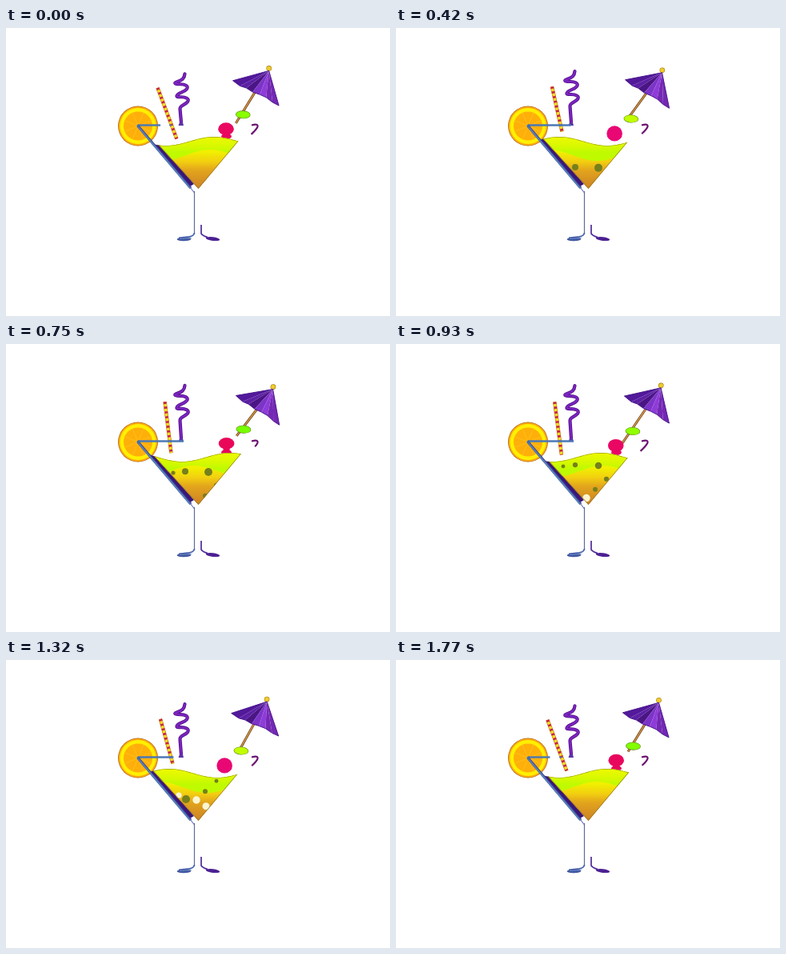
An HTML page with a canvas for the animation above (1800 ms loop, 480 px wide and 360 px high).

```html
<!DOCTYPE html>
<html lang="en">
<head>
<meta charset="utf-8">
<title>Cocktail</title>
<style>
  html, body { margin: 0; width: 100%; height: 100%; overflow: hidden; background: #fff; }
  canvas { display: block; width: 480px; height: 360px; }
</style>
</head>
<body>
<canvas id="stage" width="480" height="360"></canvas>
<script>
const c = document.getElementById('stage').getContext('2d');
const LOOP = 1800, SLOSH = 900, STEP = 30;
const TAU = Math.PI * 2;

// sway: slow swing of straw and spiral; bob: floating of olive and cherry.
let time = 0, sway = 0, bob = 0;
const osc = (peak, period) => Math.cos(TAU * (time - peak) / period);

function trace(pts) {
  c.beginPath();
  pts.forEach(([x, y]) => c.lineTo(x, y));
}
function poly(color, pts) {
  trace(pts);
  c.fillStyle = color;
  c.fill();
}
function line(color, width, pts) {
  trace(pts);
  c.strokeStyle = color;
  c.lineWidth = width;
  c.stroke();
}
function oval(color, x, y, rx, ry = rx, turn = 0) {
  c.beginPath();
  c.ellipse(x, y, rx, ry, turn, 0, TAU);
  c.fillStyle = color;
  c.fill();
}
function stroke(color, width, d) {
  c.strokeStyle = color;
  c.lineWidth = width;
  c.stroke(new Path2D(d));
}

function drawOrange() {
  const x = 165, y = 122.5;
  oval('#a9621c', x, y, 25);
  oval('#ffac10', x, y, 24.3);
  oval('#fff000', x, y, 22.5);
  oval('#ffaf0a', x, y, 18);
  for (let i = 0; i < 8; i++) {
    const a = (i + 0.5) * TAU / 8;
    line('#ffbf18', 1, [[x, y], [x + 18 * Math.cos(a), y + 18 * Math.sin(a)]]);
  }
}

function drawStraw() {
  const x = 194 + 4.7 * sway, y = 73.6 - 1.3 * sway;
  const footY = 134 + 4.5 * osc(0, SLOSH);
  const footX = x + (footY - y) * (0.25 - 0.13 * sway);
  const pts = [[x, y], [footX, footY]];
  line('#a0522a', 4.4, pts);
  line('#f8dc20', 3.6, pts);
  c.setLineDash([2.6, 3.4]);
  line('#c8243c', 3.8, pts);
  c.setLineDash([]);
}

function drawSpiral() {
  const lift = -2.4 - 2.8 * sway;
  c.save();
  c.translate(0, lift);
  c.lineCap = c.lineJoin = 'round';
  const d = 'M223.5 57C223 63 220 65 214 67S213 70 218 70S229 72 226 76'
    + 'C223 80 217 80 214.5 83S214 86 219 86S230 88 227 92C224 96 217 96 217.5 101L219 '
    + (118 - lift);
  stroke('#53128c', 4.2, d);
  stroke('#7c24be', 2.6, d);
  c.restore();
  poly('#5a35a5', [[215.5, 122], [217, 118], [221, 118], [222, 122]]);
}

function drawUmbrella() {
  const tilt = 2.1 + 4.1 * osc(570, LOOP) + osc(720, SLOSH);
  c.save();
  c.translate(299, 105);
  c.rotate(tilt * Math.PI / 180);
  c.translate(-299, -105);
  const endY = 124 + 13 * osc(140, SLOSH / 2);
  const pole = [[311, 80], [311 - (endY - 80) * 0.6, endY]];
  line('#6d3c1c', 3, pole);
  line('#d19a45', 1.5, pole);
  oval('#a47a18', 328, 50, 3.3);
  oval('#f0cc28', 328, 50, 2.7);

  const tip = [328, 53];
  const hem = [[283, 66], [292, 72.5], [300, 75], [308, 80], [317, 83], [325, 86.5], [333, 92.5], [341, 96.5]];
  const shades = ['#52199a', '#5c20a4', '#4a1584', '#7c34c8', '#8e3cd8', '#7428b4', '#7428b4'];
  shades.forEach((shade, i) => poly(shade, [tip, hem[i], hem[i + 1]]));
  line('#45128a', 0.9, [tip, ...hem, tip]);
  c.restore();
}

function drawOlive() {
  const x = 295.2 - 1.8 * bob, y = 110.6 + 3.9 * bob;
  oval('#5f8410', x, y, 9.3, 5, 0.05);
  oval(`hsl(${82 - 10 * bob} 100% 50%)`, x, y, 8.7, 4.4, 0.05);
}

function drawCherry() {
  const x = 274.2 - 1.4 * bob, y = 128.7 + 4.3 * bob;
  const pink = `hsl(${334 - 4 * bob} 94% 47%)`;
  poly(pink, [[x - 4, y], [x + 4, y], [x + 4, 138], [x - 4, 138]]);
  oval(pink, 275.5, 135.5, 6.5, 3.5);
  oval(pink, x, y, 9.8, 8.6 + 1.3 * bob);
}

function drawCurl() {
  const y = 132 + 5 * osc(200, SLOSH);
  const x = 315 - (y - 124) * 0.95;
  stroke('#6b1270', 2.1, `M307 121.5Q315.5 119 314.5 123.5Q313 127 ${x} ${y}`);
}

// A wave of the given length that travels its own length in one slosh.
function wave(level, height, crest, direction) {
  const length = 120, pts = [];
  const center = crest + direction * length * time / SLOSH;
  for (let x = 180; x <= 298; x += 2) {
    pts.push([x, level + height * Math.cos(TAU * (x - center) / length)]);
  }
  return pts;
}

// Birth time, x and size; every bubble rises alike and shrinks near the top.
const darkBubbles = [
  [-47, 224, 4], [-28, 253, 5], [-6, 209, 2.6],
  [347, 263, 3.1], [636, 249, 3], [853, 225, 5]
];
const paleBubbles = [[742, 216, 3.6], [876, 238, 4.7], [1049, 250, 4.5]];

function drawBubbles(color, bubbles) {
  const fade = Math.min(1, Math.max(0, (1710 - time) / 120));
  for (const [birth, x, size] of bubbles) {
    const y = 195 - 0.045 * (time - birth);
    const shrink = Math.min(1, Math.max(0, (y - 140) / 14));
    if (time >= birth) oval(color, x, y, size * shrink * fade);
  }
}

function drawDrink() {
  const top = wave(141.5, -5.5, 260, -1);
  const band = wave(159, 7, 195, 1);
  const cup = [[176, 130], [240.5, 201], [300, 130]];

  c.save();
  trace([...top, [298, 210], [180, 210]]);
  c.clip();
  poly('#3a1678', [[174, 132], [180, 132], [235, 195], [230, 198]]);
  trace(cup);
  c.clip();
  const g = c.createLinearGradient(0, 135, 0, 201);
  g.addColorStop(0, '#ecfa00');
  g.addColorStop(0.3, '#f0f000');
  g.addColorStop(0.48, '#f2d010');
  g.addColorStop(0.65, '#e2a51c');
  g.addColorStop(1, '#cc8026');
  c.fillStyle = g;
  c.fillRect(170, 130, 140, 80);

  const lime = c.createLinearGradient(0, 137, 0, 155);
  lime.addColorStop(0, 'rgba(232, 250, 0, .5)');
  lime.addColorStop(1, '#c0fa00');
  poly(lime, [[180, 130], [298, 130], ...band.reverse()]);
  drawBubbles('#75801c', darkBubbles);
  drawBubbles('#fbf6d2', paleBubbles);
  line('#93741c', 1.2, cup);
  line('#9a9a18', 1.2, top);
  c.restore();
}

function drawGlass() {
  line('#3e3690', 3.2, [[165, 122.5], [231, 200]]);
  line('#5480b8', 2, [[164.6, 122.5], [230, 200]]);
  line('#6272b4', 1.2, [[230, 199], [235.5, 206]]);
  line('#4c78b4', 2.4, [[165, 121.5], [Math.min(222, 214 + 22 * sway), 121.5]]);
  line('#4c78b4', 1.6, [[204, 121.5], [207.5, 121.5]]);
  oval('#426eac', 165.5, 122.5, 2);
  line('#5d6c9c', 1.2, [[235.5, 204], [235.5, 258]]);

  stroke('#4a65ae', 1.8, 'M235.5 256Q235 260 229 261L216 262.5');
  oval('#3f55a0', 222.5, 264, 8.8, 2.3, -0.04);
  line('#7f98d0', 0.8, [[217, 263.5], [232, 262.5]]);
  stroke('#4f2b98', 1.7, 'M244 246V257Q246 260 252 261.5');
  oval('#4c2092', 258.5, 263.6, 8.8, 2.3, 0.12);
}

function draw() {
  sway = osc(810, LOOP);
  bob = osc(315, SLOSH);
  c.clearRect(0, 0, 480, 360);
  drawOrange();
  drawStraw();
  drawSpiral();
  drawUmbrella();
  drawOlive();
  drawCherry();
  drawCurl();
  drawDrink();
  drawGlass();
}

const start = performance.now();
function tick() {
  time = Math.floor((performance.now() - start) / STEP) * STEP % LOOP;
  draw();
  requestAnimationFrame(tick);
}
tick();
</script>
</body>
</html>
```
